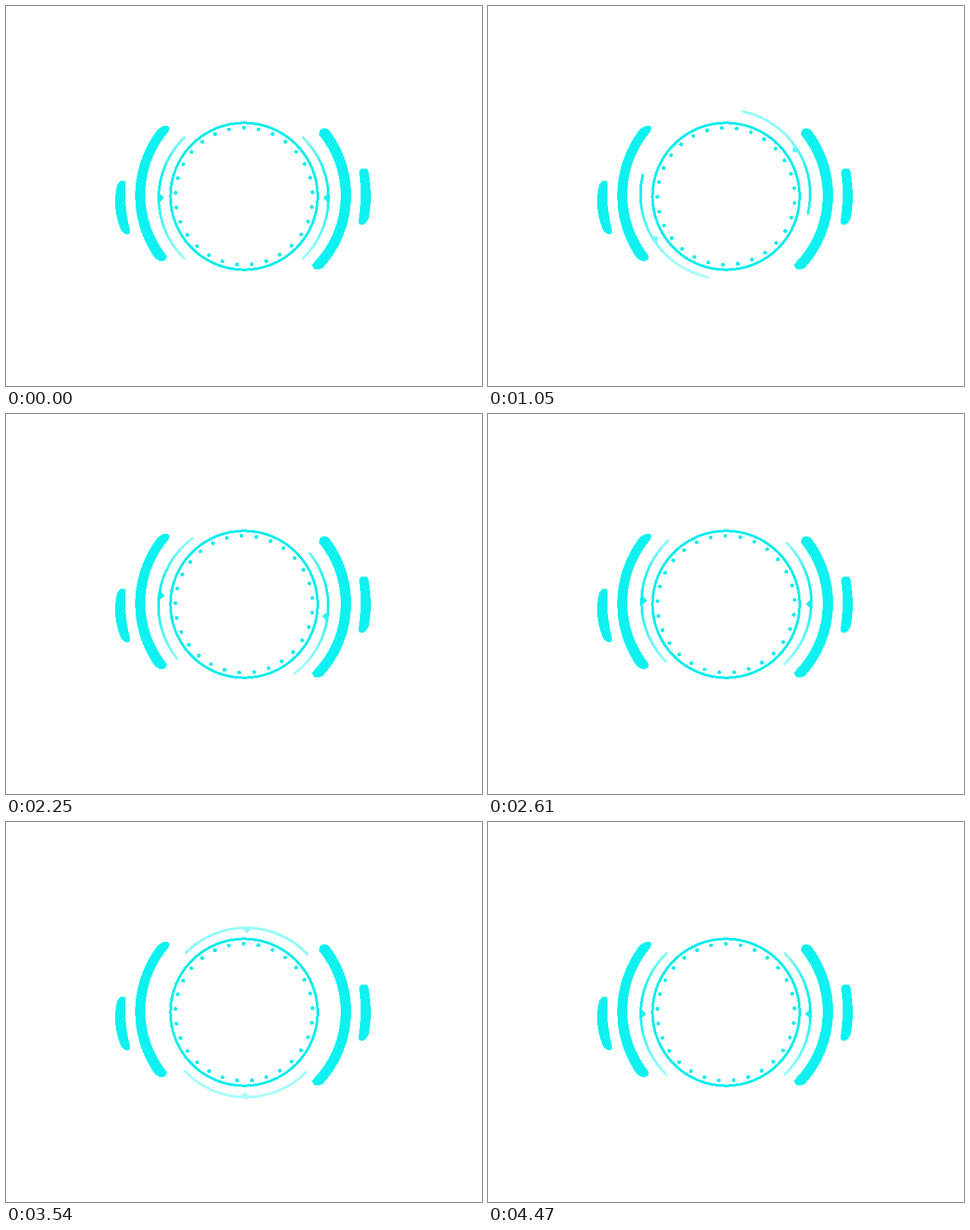
Recreate the animation shown at these times as an HTML page. Size 745 by 596 pixels, loop 4500 ms.

```html
<!DOCTYPE html>
<html>
<head>
<meta charset="utf-8">
<style>
  html, body { margin: 0; width: 100%; height: 100%; overflow: hidden; background: #fff; }
  svg { display: block; }
</style>
</head>
<body>
<svg width="745" height="596" shape-rendering="crispEdges">
  <!-- Vertical fade that stays fixed while the arcs turn through it -->
  <linearGradient id="fade" gradientUnits="userSpaceOnUse" x1="0" y1="165" x2="0" y2="431">
    <stop offset="0" stop-color="#98fbf9"/>
    <stop offset=".154" stop-color="#8af8f7"/>
    <stop offset=".32" stop-color="#30f0f0"/>
    <stop offset=".47" stop-color="#08eeee"/>
    <stop offset=".545" stop-color="#20f1f1"/>
    <stop offset=".677" stop-color="#55f6f6"/>
    <stop offset=".868" stop-color="#a3fbfb"/>
    <stop offset="1" stop-color="#aafcfc"/>
  </linearGradient>
  <path fill="#0ef1f0" d="
    M230 391 A171 171 0 0 1 236.5 195 Q246 186 253 188 Q258 191 254 197
    A154 154 0 0 0 251.5 392 Q252 399 245 400 Q236 401 230 391Z
    M506.6 196 A168.5 168.5 0 0 1 496 410.5 Q488 415 482 412 Q477 406 481.2 403
    A151.5 151.5 0 0 0 490 202 Q490 194 496 192 Q502 191 506.6 196Z
    M173 285 Q175 274 184 273.5 L187.5 276 Q186 285 187 300 Q187 327 194.5 353
    Q194 358 189 358 Q180 356 177.5 345 Q167 315 173 285Z
    M553 262 Q553 255 558 255 L564 255 Q567 256 568 264 Q574 300 568 332
    Q563 343 558 343 Q552 343 551.5 339 Q558 300 553 262Z"/>
  <circle cx="372.6" cy="298.5" r="115.2" fill="none" stroke="#06eded" stroke-width="4"/>
  <g id="dots" fill="#06eded"></g>
  <path id="arcs" fill="none" stroke="url(#fade)" stroke-width="4" stroke-linecap="round"/>
  <path id="notches" fill="url(#fade)"/>
</svg>
<script>
const [dots, arcs, notches] = ['dots', 'arcs', 'notches'].map(id => document.getElementById(id));
const STEP = 30, STEPS = 150;
const DOTS = 29, PITCH = 360 / DOTS;
const RADIUS = 132.3, HALF_SPAN = 0.8, HALF_NOTCH = 0.07;

for (let i = 0; i < DOTS; i++) {
  dots.innerHTML += `<circle cy="-107.4" r="2.9" transform="rotate(${i * PITCH})"/>`;
}

// The pair of arcs turns about a point slightly off its own centre;
// each arc can also stand a little further out along its own direction.
function arcPaths(turn, side, outward) {
  const angle = turn + side;
  const x = 372.5 - 3 * Math.sin(turn) + outward * Math.cos(angle);
  const y = 298.2 + 3 * Math.cos(turn) + outward * Math.sin(angle);
  const point = (r, a) => `${x + r * Math.cos(angle + a)} ${y + r * Math.sin(angle + a)}`;
  return {
    arc: `M${point(RADIUS, -HALF_SPAN)} A${RADIUS} ${RADIUS} 0 0 1 ${point(RADIUS, HALF_SPAN)}`,
    notch: `M${point(RADIUS + 1.5, -HALF_NOTCH)} L${point(123.7, 0)} L${point(RADIUS + 1.5, HALF_NOTCH)}Z`
  };
}

function draw(now) {
  const progress = Math.floor(now / STEP) % STEPS / (STEPS - 1);
  const turn = 6 * progress * Math.PI * 2;
  const right = arcPaths(turn, 0, 0);
  const left = arcPaths(turn, Math.PI, 1.2);
  arcs.setAttribute('d', right.arc + left.arc);
  notches.setAttribute('d', right.notch + left.notch);
  dots.setAttribute('transform', `translate(372.6 298.4) rotate(${-48 * progress * PITCH - 0.2})`);
}

function tick() {
  draw(performance.now());
  requestAnimationFrame(tick);
}
tick();
</script>
</body>
</html>
```
